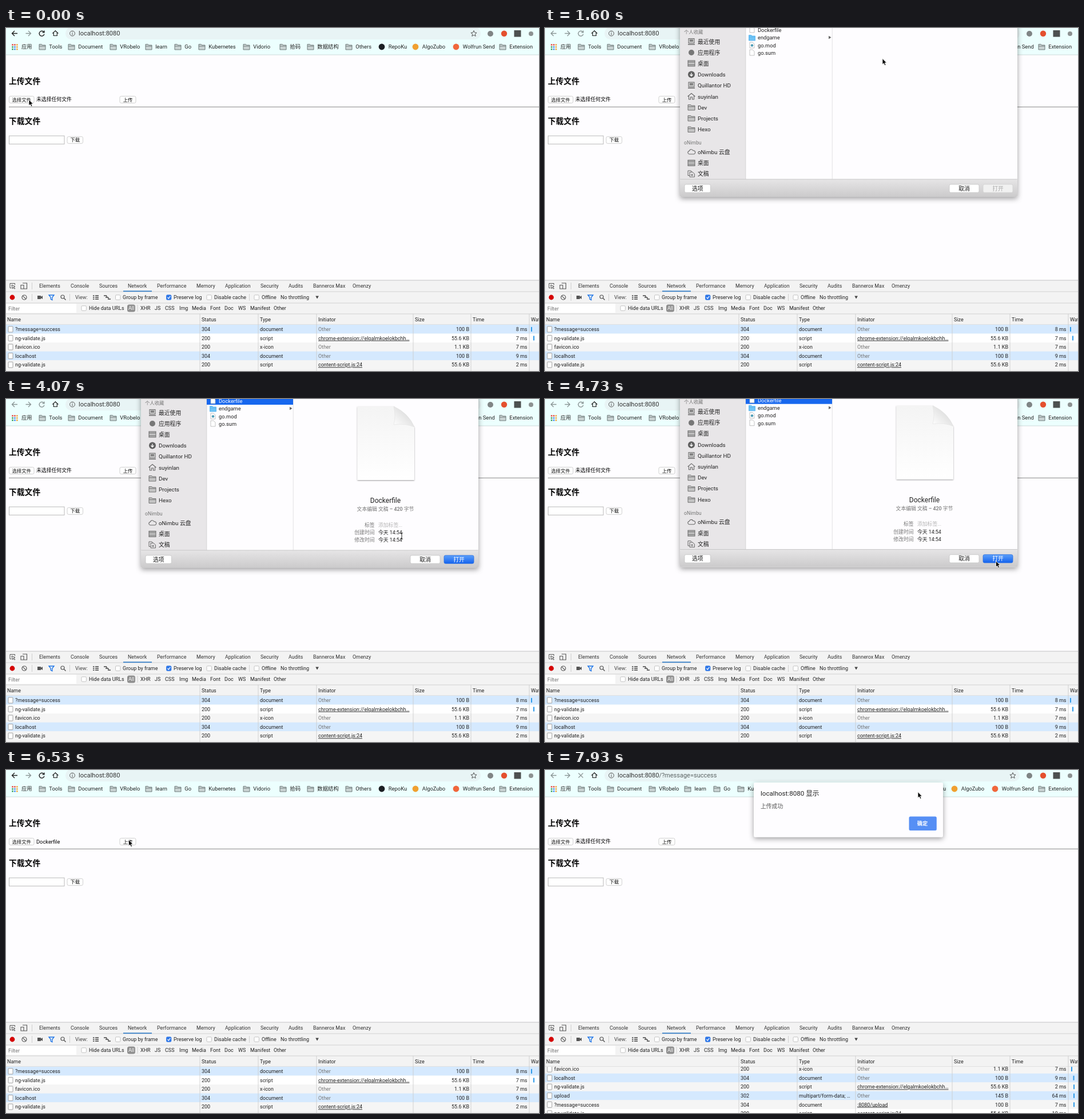
An HTML page that plays this animation: 932x601 px, repeating every 8 s.

```html
<!DOCTYPE html>
<html lang="zh">
<head>
<meta charset="utf-8">
<title>Upload demo</title>
<style>
  html, body { margin: 0; width: 100%; height: 100%; overflow: hidden; background: #fefdff; }
  svg { display: block; width: 932px; height: 601px; }
  text { font-family: Roboto, "Noto Sans CJK SC", "Noto Sans CJK", sans-serif; white-space: pre; }
</style>
</head>
<body>
<svg id="stage" viewBox="0 0 932 601" xmlns="http://www.w3.org/2000/svg"></svg>
<script>
// ---- drawing helpers; text is placed by its vertical centre ----
const text = (x, y, s, size = 9, fill = '#222', more = '') =>
  `<text x="${x}" y="${y + size * 0.36}" font-size="${size}" fill="${fill}" ${more}>${s}</text>`;
const rect = (x, y, w, h, fill, more = '') =>
  `<rect x="${x}" y="${y}" width="${w}" height="${h}" fill="${fill}" ${more}/>`;
const circle = (x, y, r, fill, more = '') =>
  `<circle cx="${x}" cy="${y}" r="${r}" fill="${fill}" ${more}/>`;
const line = (d, color, w = 1, more = '') =>
  `<path d="${d}" fill="none" stroke="${color}" stroke-width="${w}" ${more}/>`;
const group = (id, body, more = '') => `<g id="${id}" ${more}>${body}</g>`;
const MID = 'text-anchor="middle"', END = 'text-anchor="end"', BOLD = 'font-weight="700"';

const button = (x, y, w, h, label, size, fill = '#fff', color = '#111', stroke = '#c4c4c4') =>
  rect(x, y, w, h, fill, `rx="2.5" stroke="${stroke}" stroke-width=".8"`) +
  text(x + w / 2, y + h / 2, label, size, color, MID);
const folder = (x, y, w = 11, fill = '#c9d3d3', stroke = '#657070') =>
  `<path d="M${x} ${y - 4.5}h${w * .4}l1.2 1.5H${x + w}v8H${x}zM${x} ${y - 1.2}h${w}" fill="${fill}" stroke="${stroke}" stroke-width=".9"/>`;
const page = (x, y, w, h, stroke = '#aaa') =>
  `<path d="M${x} ${y}h${w - 3}l3 3v${h - 3}h${-w}z" fill="#fff" stroke="${stroke}" stroke-width=".7"/>`;

const defs = `<defs>
  <linearGradient id="bar" x2="0" y2="1"><stop stop-color="#e6e5e6"/><stop offset="1" stop-color="#cbcacb"/></linearGradient>
  <linearGradient id="blue" x2="0" y2="1"><stop stop-color="#5c9ffa"/><stop offset="1" stop-color="#1463ee"/></linearGradient>
  <linearGradient id="paper" x2="0" y2="1"><stop stop-color="#f4f4f4"/><stop offset="1" stop-color="#fff"/></linearGradient>
  <linearGradient id="fold" x1="0" y1="1" x2="1" y2="0"><stop stop-color="#fff"/><stop offset="1" stop-color="#cfcfcf"/></linearGradient>
  <filter id="shadow" x="-10%" y="-10%" width="120%" height="125%"><feDropShadow dx="0" dy="3" stdDeviation="5" flood-opacity=".38"/></filter>
  <filter id="soft" x="-10%" y="-10%" width="120%" height="120%"><feDropShadow dx="0" dy="1" stdDeviation="1.2" flood-opacity=".4"/></filter>
  <clipPath id="rowsClip"><rect y="520" width="932" height="81"/></clipPath>
</defs>`;

// ---- browser toolbar ----
function browser() {
  const bookmarks = [[58, 'Tools'], [109, 'Document'], [182, 'VRobelo'], [244, 'learn'], [295, 'Go'],
    [337, 'Kubernetes'], [415, 'Vidorio'], [479, '拾码'], [527, '数据结构'], [594, 'Others'], [863, 'Extension']];
  const sites = [[657, 'RepoKu', '#1b1f23'], [716, 'AlgoZubo', '#f0a030'], [787, 'Wolfrun Send', '#f0673c']];
  const appColors = ['#e8453c', '#e8453c', '#f2a33a', '#3a9e58', '#4285f4', '#f2a33a', '#3a9e58', '#4285f4', '#f2a33a'];
  return rect(0, 0, 932, 47, '#ecfffe') + rect(0, 46.5, 932, 1, '#cfdcdc') +
    rect(104, -1, 726, 21, '#e8f4f5', 'rx="10"') +
    line('M86.3 4.8l4.4 4.2h-1.4v4.5h-6v-4.5h-1.4z', '#222', 1.2) +
    circle(116, 9.5, 4.4, 'none', 'stroke="#555" stroke-width="1"') +
    line('M116 9v3M116 6.8v1.1', '#555', 1.1) +
    line('M818 4.6l1.5 3.4 3.6.3-2.8 2.4.9 3.6-3.2-1.9-3.2 1.9.9-3.6-2.8-2.4 3.6-.3z', '#555', 1) +
    circle(847, 10, 5, '#7f8585') + circle(871, 9.7, 5.2, '#e4502e') +
    rect(888.5, 4, 12, 11.5, '#4d5050') + circle(918, 10, 4, '#8d9292') +
    appColors.map((c, i) => rect(10.3 + i % 3 * 3.9, 28.2 + Math.floor(i / 3) * 3.9, 2.5, 2.5, c)).join('') +
    text(27, 33, '应用', 9.2) +
    bookmarks.map(([x, s]) => folder(x, 33) + text(x + 17.3, 33, s, 9.4)).join('') +
    sites.map(([x, s, c]) => circle(x, 33, 5.4, c) + text(x + 11.8, 33, s, 9.4)).join('') +
    line('M20 9.5H11M15 5l-4.5 4.5L15 14', '', 1.4, 'id="back"') +
    line('M34.5 9.5h9M39 5l4.5 4.5L39 14', '#8b9696', 1.3) +
    line('M66.2 7.2A4.4 4.4 0 1 0 66.9 10.6M66.9 4.5v3.4h-3.4', '', 1.4, 'id="reload"') +
    line('M58.5 5.5l8 8M66.5 5.5l-8 8', '#8b9696', 1.2, 'id="stop"') +
    `<text x="127" y="13.4" font-size="11" fill="#333">localhost:8080<tspan id="path" fill="#5c6464">/?message=success</tspan></text>`;
}

// ---- web page ----
const webPage = () =>
  text(5, 93, '上传文件', 13.8, '#000', BOLD) +
  button(5.5, 119.5, 43.5, 12, '选择文件', 8.4) +
  text(53, 125.3, '未选择任何文件', 8.85, '#000', 'id="noFile"') +
  text(53, 125.3, 'Dockerfile', 9.3, '#000', 'id="hasFile"') +
  button(199, 119.5, 28, 12, '上传', 8.4) +
  rect(5, 137.8, 927, 1.2, '#9b9b9b') +
  text(5, 163, '下载文件', 13.8, '#000', BOLD) +
  rect(5.5, 189, 96.5, 14.3, '#fff', 'stroke="#b9b9b9" stroke-width="1"') +
  button(107, 190.3, 27.5, 12, '下载', 8.4);

// ---- developer tools ----
const requests = [
  ['?message=success', 304, 'document', 'Other', '100 B', '8 ms', 918],
  ['ng-validate.js', 200, 'script', 'chrome-extension://elgalmkoelokbchh…', '55.6 KB', '7 ms', 922],
  ['favicon.ico', 200, 'x-icon', 'Other', '1.1 KB', '7 ms', 0],
  ['localhost', 304, 'document', 'Other', '100 B', '9 ms', 0],
  ['ng-validate.js', 200, 'script', 'content-script.js:24', '55.6 KB', '2 ms', 0]];
const afterUpload = [...requests.slice(2, 4).map((r, i) => [...r.slice(0, 6), 920 + i * 3.5]),
  ['ng-validate.js', 200, 'script', 'chrome-extension://elgalmkoelokbchh…', '55.6 KB', '2 ms', 924],
  ['upload', 302, 'multipart/form-data; …', 'Other', '145 B', '64 ms', 924],
  ['?message=success', 304, 'document', ':8080/upload', '100 B', '7 ms', 924],
  ['ng-validate.js', 200, 'script', 'content-script.js:24', '55.6 KB', '10 ms', 0]];

function requestRow([name, status, type, from, size, time, tick], i, top, blueRows) {
  const y = top + i * 15.55, c = y + 7.9, plain = from === 'Other';
  const fill = blueRows.includes(i) ? '#d5e9fe' : i % 2 ? '#fff' : '#f5f5f5';
  return rect(0, y, 932, 15.55, fill) +
    rect(4, c - 5, 8, 10, '#fff', 'rx=".8" stroke="#8a8a8a" stroke-width=".8"') +
    text(16, c, name) + text(342, c, status) + text(444, c, type) +
    text(546, c, from, 9, plain ? '#777' : '#222', plain ? '' : 'text-decoration="underline"') +
    text(810, c, size, 9, '#222', END) + text(911.5, c, time, 9, '#222', END) +
    (tick ? rect(tick, c - 4, 2, 8, '#2f9bea') : '');
}

function devTools() {
  const tabs = [[58, 'Elements'], [113, 'Console'], [163, 'Sources'], [213, 'Network'], [264, 'Performance'], [333, 'Memory'],
    [383, 'Application'], [445, 'Security'], [494, 'Audits'], [537, 'Bannerox Max'], [606, 'Omenzy']];
  const filters = [[235, 'XHR'], [260, 'JS'], [278, 'CSS'], [303, 'Img'], [325, 'Media'], [357, 'Font'],
    [382, 'Doc'], [406, 'WS'], [427, 'Manifest'], [468, 'Other']];
  const columns = [[2, 'Name'], [342, 'Status'], [444, 'Type'], [546, 'Initiator'], [715, 'Size'], [816, 'Time'], [918, 'Wat']];
  const check = (x, y, on) => rect(x, y - 4.2, 8.4, 8.4, on ? '#2f78e8' : '#fff', `rx="1.6" stroke="${on ? '#2f78e8' : '#b5b5b5'}" stroke-width=".8"`) +
    (on ? line(`M${x + 2} ${y}l1.8 2 3-4.2`, '#fff', 1.2) : '');
  const divider = (x, y) => rect(x, y - 6, .9, 12, '#ccc');
  return rect(0, 442, 932, 159, '#f3f3f3') + rect(0, 441.5, 932, 1, '#c4c4c4') +
    [461.5, 481.5, 500.5, 519.5].map(y => rect(0, y, 932, .9, '#cdcdcd')).join('') +
    line('M9.5 455.5H7v-8h8.5v2.5M10 450l6 2.8-2.6.9 2.4 2.6-1 .9-2.4-2.6-1 2.2z', '#555', 1) +
    line('M29 447h7.5v10H29M26 450.5h5v6.5h-5z', '#555', 1.1) + divider(45, 452) +
    tabs.map(([x, s]) => text(x, 452, s, 8.9, '#333')).join('') +
    rect(205, 460.3, 50, 1.8, '#3d83c9') +
    circle(11, 472, 4.4, '#d50000') +
    circle(32, 472, 4, 'none', 'stroke="#555" stroke-width="1.2"') + line('M29.2 469.2l5.6 5.6', '#555', 1.2) + divider(45, 472) +
    '<path d="M55 469h6v2l3-2v6l-3-2v2h-6z" fill="#555"/>' +
    line('M75 468h9l-3.2 4v4.5l-2.6-1.5v-3z', '#1a73e8', 1.3) +
    circle(99, 471, 3, 'none', 'stroke="#555" stroke-width="1.2"') + line('M101.2 473.2l3.3 3.3', '#555', 1.4) + divider(111, 472) +
    text(121, 472, 'View:', 9, '#444') +
    line('M152 469h2.5M156 469h6M152 472h2.5M156 472h6M152 475h2.5M156 475h6', '#444', 1.6) +
    line('M171 469h5M174 472h5M178 475h5M176 469v2M179 472v2', '#444', 1.3) +
    check(191.5, 472) + text(204, 472, 'Group by frame') +
    check(280.5, 472, true) + text(293, 472, 'Preserve log') +
    check(351, 472) + text(364, 472, 'Disable cache') + divider(425, 472) +
    check(434, 472) + text(447, 472, 'Offline') + text(480, 472, 'No throttling') +
    '<path d="M541.3 469.5h5.6l-2.8 5z" fill="#444"/>' +
    rect(0, 483, 123, 16, '#fff') + text(4, 491.4, 'Filter', 9, '#757575') +
    check(132, 491) + text(145, 491, 'Hide data URLs') +
    rect(212, 484.5, 14, 13, '#8f8f8f', 'rx="3.5"') + text(219, 491, 'All', 9, '#fff', MID) + divider(229.5, 491) +
    filters.map(([x, s]) => text(x, 491, s)).join('') +
    columns.map(([x, s]) => text(x, 510.3, s)).join('') +
    `<g clip-path="url(#rowsClip)">` +
    group('rowsBefore', requests.map((r, i) => requestRow(r, i, 520, [0, 3])).join('')) +
    group('rowsAfter', afterUpload.map((r, i) => requestRow(r, i, 516.2, [1, 3])).join('')) + '</g>' +
    [339, 441, 543, 712, 813, 915].map(x => rect(x - .4, 501, .8, 100, '#c9c9c9')).join('');
}

// ---- file chooser sheet ----
function sideIcon(kind, y) {
  const grey = '#686868';
  switch (kind) {
    case 'folder': return folder(250, y, 12, '#c4c4c4', grey);
    case 'app': return circle(256, y, 5, '#777');
    case 'down': return circle(256, y, 6, '#5f5f5f') + line(`M256 ${y - 3}v5.5M253.5 ${y}l2.5 2.7 2.5-2.7`, '#fff', 1.3);
    case 'home': return line(`M249.5 ${y}l6.5-5.5 6.5 5.5M251.5 ${y - 1}v6h3v-4h3v4h3v-6`, grey, 1.1);
    case 'cloud': return line(`M252 ${y + 4}a2.8 2.8 0 0 1 .2-5.5a3.6 3.6 0 0 1 6.8-.6a2.6 2.6 0 0 1 1.2 6.1z`, grey, 1.1);
    case 'docs': return line(`M253 ${y + 3}h-3v-8.5h5l2 2M253 ${y - 3}h5l3.5 3v5.5H253zM255 ${y + 1}h4M255 ${y + 3}h4`, grey, 1);
    case 'desk': return rect(250, y - 5, 12, 10, '#bdbdbd', `stroke="${grey}"`) + line(`M250 ${y - 2.5}h12M250 ${y + 2.5}h12`, grey, .9);
    default: return rect(251, y - 5.5, 10, 8, '#d0d0d0', `stroke="${grey}"`) + line(`M253 ${y - 3}h6M253 ${y - 1}h6M250 ${y + 4.8}h12`, grey, 1.4);
  }
}

function sheet() {
  const side = [['list', 24, '最近使用'], ['app', 43, '应用程序'], ['desk', 62, '桌面'], ['down', 81.5, 'Downloads'],
    ['list', 100.5, 'Quillantor HD'], ['home', 120, 'suyinlan'], ['folder', 139, 'Dev'], ['folder', 158, 'Projects'],
    ['folder', 177.5, 'Hexo'], ['cloud', 217, 'oNimbu 云盘'], ['desk', 236.5, '桌面'], ['docs', 255.5, '文稿']];
  const info = (y, label, value, color = '#222') =>
    text(644.5, y, label, 8.8, '#777', END) + text(651, y, value, 8.8, color);
  const preview = `<g filter="url(#soft)"><path d="M614.5 13H678L714 49V142H614.5z" fill="url(#paper)"/></g>` +
    `<path d="M678 13Q682 30 678 45Q697 42 714 49Q704 25 678 13z" fill="url(#fold)" stroke="#ddd" stroke-width=".5"/>` +
    text(663.5, 178, 'Dockerfile', 12, '#222', MID) +
    text(663.5, 193, '文本编辑 文稿 – 420 字节', 8.8, '#777', MID + ' font-weight="500"') +
    info(220.5, '标签', '添加标签...', '#b5b5b5') + info(233.8, '创建时间', '今天 14:54') + info(247, '修改时间', '今天 14:54');
  return rect(236, -60, 590, 356, '#fefdff', 'rx="3" filter="url(#shadow)"') +
    rect(236, -60, 115, 325, '#e8e6e8') + rect(350.5, -60, .8, 325, '#cfcfcf') + rect(501.8, -60, .8, 325, '#ddd') +
    text(243, 6.5, '个人收藏', 8.4, '#777') + text(243, 201, 'oNimbu', 8.7, '#777') +
    side.map(([k, y, s]) => sideIcon(k, y) + text(267, y, s, 9.8)).join('') +
    rect(351, -3.5, 151, 13.5, '#1767ee', 'id="selected"') +
    page(358, -2, 8, 10) + text(372, 4, 'Dockerfile', 9.3, '#222', 'id="fileName"') +
    folder(356.5, 17, 11, '#6ec3f5', '#5ab4ec') + text(372, 17, 'endgame', 9.3) +
    '<path d="M496 13.8l4.5 2.7-4.5 2.7z" fill="#666"/>' +
    page(358, 25, 8, 10) + circle(362, 30.5, 2.2, '#4c9bb5') + text(372, 30.3, 'go.mod', 9.3) +
    page(358, 38, 8, 10) + text(372, 43.6, 'go.sum', 9.3) +
    group('preview', preview) +
    rect(236, 265, 590, 31, '#f3f2f3', 'rx="2" id="footer"') + rect(236, 264.6, 590, .8, '#bdbdbd') +
    button(244, 274, 45.5, 14.3, '选项', 9.8) + button(707, 274, 52, 14.3, '取消', 9.8) +
    group('openOff', button(766, 274, 52, 14.3, '打开', 9.8, '#f1f1f1', '#aaa', '#d2d2d2')) +
    group('openOn', button(766, 274, 52, 14.3, '打开', 9.8, 'url(#blue)', '#fff', '#2a6fe0'));
}

const alertBox = () =>
  rect(365, 22, 331, 95.5, '#fefdff', 'rx="3" filter="url(#shadow)"') +
  text(377, 41, 'localhost:8080 显示', 11.6) + text(377, 63, '上传成功', 9.8, '#555') +
  rect(636.5, 81.5, 48.3, 24.5, '#568ff5', 'rx="2.5"') + text(660, 94, '确定', 9.2, '#fff', MID + ' ' + BOLD);

const pointer = () =>
  group('arrow', '<path d="M0 0V10.4L2.4 8.2L4.1 12L6 11.2L4.3 7.5H7.4z" fill="#000" stroke="#fff" stroke-width=".8"/>') +
  group('beam', line('M-2-5.5Q0-5.5 0-4V4Q0 5.5-2 5.5M2-5.5Q0-5.5 0-4M0 4Q0 5.5 2 5.5', '#222', 1));

const stage = document.getElementById('stage');
stage.innerHTML = defs + browser() + webPage() + devTools() + group('sheet', sheet()) + group('alert', alertBox()) + pointer();

// ---- motion ----
const LOOP = 8000, STEP = 200 / 3;
const sheetTrack = [[867, -312], [933, -262], [1000, -168], [1067, -70], [1133, -12], [1200, 0],
  [4733, 0], [4800, -66], [4867, -170], [4933, -254], [5000, -312]];
const cursorTrack = [[0, 40, 125.5], [733, 40, 125.5], [1000, 208.5, 121], [1333, 520, 64], [1600, 590, 53.5], [2400, 590, 53.5],
  [2933, 410, 8], [3133, 396, 4], [3600, 396, 4], [4067, 692, 240], [4400, 784, 280], [4600, 788.5, 284],
  [5200, 788.5, 284], [5900, 240, 130], [6133, 214.5, 122.5], [6800, 214.5, 122.5], [7333, 610, 52], [7600, 652, 38.5]];

function sample(track, t) {
  const next = track.findIndex(key => key[0] > t);
  if (next === 0) return track[0].slice(1);
  if (next < 0) return track[track.length - 1].slice(1);
  const a = track[next - 1], b = track[next];
  let k = (t - a[0]) / (b[0] - a[0]);
  if (b[0] - a[0] > 150) k = k * k * (3 - 2 * k);
  return a.slice(1).map((v, i) => v + (b[i + 1] - v) * k);
}

const $ = id => document.getElementById(id);
const show = (id, on) => $(id).setAttribute('display', on ? 'inline' : 'none');
const paint = (id, attr, value) => $(id).setAttribute(attr, value);

function draw(time) {
  const t = Math.floor((time + 4) / STEP) * STEP + 1;
  const between = (from, to) => t >= from && t < to;
  const selected = between(3330, 5060), loaded = t >= 6800, alerting = t >= 6930;
  const navColor = between(1050, 5060) || alerting ? '#8b9696' : '#222';

  paint('back', 'stroke', navColor);
  paint('reload', 'stroke', navColor);
  show('reload', !loaded); show('stop', loaded); show('path', loaded);

  const chosen = between(5060, 6800);
  show('noFile', !chosen); show('hasFile', chosen);
  show('rowsBefore', !loaded); show('rowsAfter', loaded);

  show('sheet', between(900, 5000));
  paint('sheet', 'transform', `translate(0 ${sample(sheetTrack, t)[0]})`);
  paint('footer', 'fill', t > 1130 ? 'url(#bar)' : '#f3f2f3');
  show('selected', selected); show('preview', selected);
  show('openOn', selected); show('openOff', !selected);
  paint('fileName', 'fill', selected ? '#fff' : '#222');
  show('alert', alerting);

  const overText = between(3990, 4130), [x, y] = sample(cursorTrack, t);
  show('arrow', !overText); show('beam', overText);
  for (const id of ['arrow', 'beam']) paint(id, 'transform', `translate(${x} ${y})`);
}

const start = performance.now();
function tick() {
  draw((performance.now() - start) % LOOP);
  requestAnimationFrame(tick);
}
tick();
</script>
</body>
</html>
```
